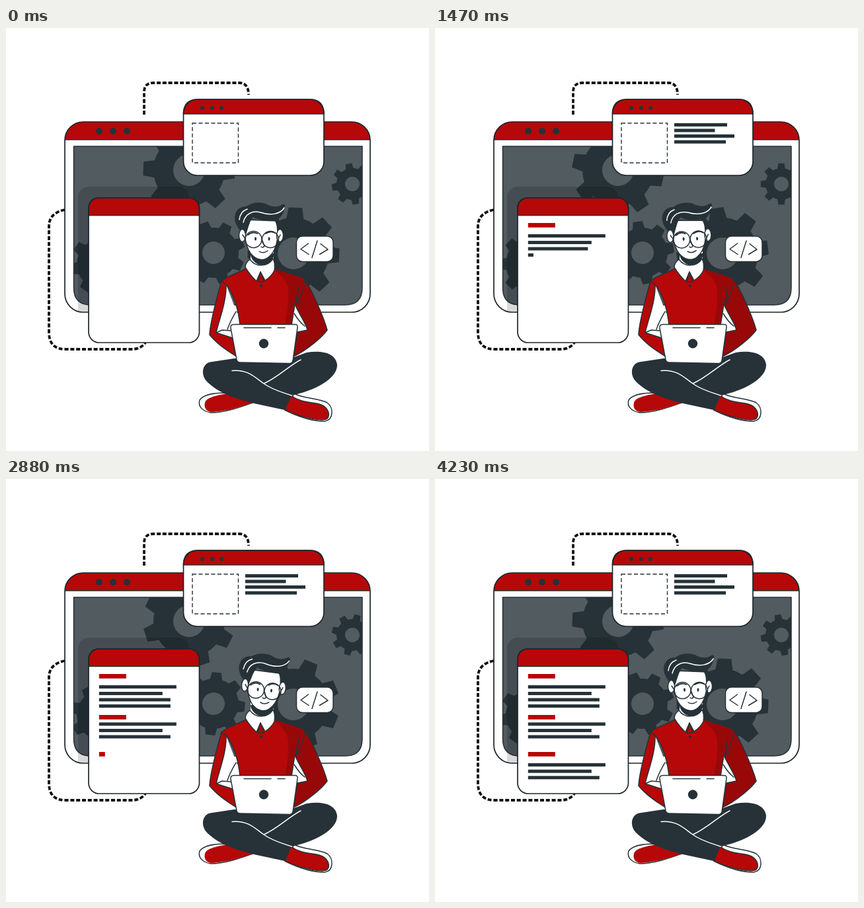
These frames come from a looping animation (640 by 640 pixels, 4.29 s). An HTML page:

```html
<!DOCTYPE html>
<html lang="en">
<head>
<meta charset="utf-8">
<title>Web development</title>
<style>
  html, body { margin: 0; width: 100%; height: 100%; overflow: hidden; background: #fff; }
  svg { display: block; width: 100%; height: 100%; }
  .red { fill: #b60808; }
  .deep { fill: #990809; }
  .dark { fill: #263238; }
  .white { fill: #fff; }
  .line { stroke: #263238; stroke-width: 1.5; stroke-linejoin: round; stroke-linecap: round; }
  .edge { fill: none; stroke: #1c2529; stroke-width: 1.7; }
  .none { fill: none; }
  .pale { fill: none; stroke: #fff; stroke-width: 1.5; stroke-linecap: round; }
  .trail { fill: none; stroke: #111; stroke-width: 3.8; stroke-dasharray: 6 2.8; }
</style>
</head>
<body>
<svg viewBox="0 0 640 640">
  <defs>
    <clipPath id="screen"><path d="M102.500 179H539V393Q539 419 513 419H128.500Q102.500 419 102.500 393Z"/></clipPath>
    <clipPath id="frame"><rect x="89" y="142" width="462" height="288" rx="28"/></clipPath>
  </defs>

  <path class="trail" d="M209 131V97Q209 83 223 83H353Q367 83 367 101"/>
  <path class="trail" d="M89 275Q65 280 65 300V460Q65 486 90 486H190Q204 486 211 476"/>

  <g id="browser">
    <rect class="white" x="89" y="142" width="462" height="288" rx="28"/>
    <g clip-path="url(#frame)">
      <rect class="red line" x="88" y="141" width="464" height="28"/>
    </g>
    <rect class="edge" x="89" y="142" width="462" height="288" rx="28"/>
    <g class="dark">
      <circle cx="141" cy="156" r="5"/><circle cx="162" cy="156" r="5"/><circle cx="183" cy="156" r="5"/>
    </g>
    <g clip-path="url(#screen)">
      <rect x="102" y="179" width="438" height="241" fill="#515b60"/>
      <g id="gears" class="dark"></g>
    </g>
    <path class="none line" d="M102.500 179H539V393Q539 419 513 419H128.500Q102.500 419 102.500 393Z"/>
    <rect clip-path="url(#frame)" x="109" y="240" width="168" height="219" rx="16" opacity=".15"/>
  </g>

  <g id="article">
    <rect class="white" x="125" y="257" width="167.500" height="219" rx="16"/>
    <path class="red line" d="M125 283.500V273Q125 257 141 257H276.500Q292.500 257 292.500 273V283.500Z"/>
    <rect class="edge" x="125" y="257" width="167.500" height="219" rx="16"/>
  </g>

  <g id="popup">
    <rect class="white" x="268.500" y="108" width="212.500" height="115" rx="21"/>
    <path class="red line" d="M268.500 130Q268.500 108 290 108H460Q481 108 481 130Z"/>
    <rect class="edge" x="268.500" y="108" width="212.500" height="115" rx="21"/>
    <g class="dark">
      <circle cx="297" cy="121" r="3"/><circle cx="312" cy="121" r="3"/><circle cx="326" cy="121" r="3"/>
    </g>
    <rect class="none" x="282" y="144" width="69.500" height="60" stroke="#263238" stroke-width="1.400" stroke-dasharray="6 3.500"/>
  </g>

  <g id="bars"></g>

  <g id="tag" class="line none">
    <rect class="white" x="439.500" y="315" width="55.500" height="38.500" rx="9"/>
    <path d="M457.500 326L446 334.500L458 342.500M471 322L463 347.500M476 326.500L487 335L474.500 342.500"/>
  </g>

  <g id="person">
    <path class="white line" d="M332 552C315 552 298 555 293 563C290 572 297 580 310 582C332 582 356 573 373 567Z"/>
    <path class="red" d="M334 553C318 556 303 559 301 567C299 574 303 581 312 581C335 580 358 572 373 567Z"/>
    <path class="white line" d="M436 553C450 561 474 560 486 567C496 574 496 593 482 595C462 595 440 587 422 578Z"/>
    <path class="red line" d="M431 556C446 567 462 566 474 569C488 573 491 585 486 591C478 597 440 587 422 578Z"/>
    <path class="dark" d="M312 505C296 506 294 525 304 535C322 553 350 562 380 569L422 578L431 556C466 549 502 531 501 509C499 492 478 487 455 491L430 500H345Z"/>
    <path class="pale" d="M342 518.500C366 516 377 529 390 538C404 548 418 551 432 556M390 538C411 529 428 511 446 502"/>

    <path class="white" d="M333 388L315 463L346 472L356 448ZM437 416L430 452L441 462L457 458Z"/>
    <path class="red line" d="M326 383C319 408 309 445 308 464C318 477 334 488 349 497L343 469L318 461C322 442 334 414 333 388Z"/>
    <path class="deep line" d="M451 379C462 395 480 435 486 457C478 468 455 488 435 497L441 460L456 457C454 447 444 434 437 418L440 390Z"/>
    <path class="red line" d="M363 364C350 371 333 376 326 383L333 388C345 403 352 428 354 450H432L437 418C446 406 453 392 451 379C438 373 420 369 407 364Z"/>
    <path class="deep" d="M406 365C420 369 438 373 450 380C452 392 445 406 436 418L431 450H422C425 433 428 414 427 397C426 383 418 376 406 367Z"/>
    <path class="none line" d="M443 392L439 414M437 419L447 412M318 461L327 457L340 458M335 456C339 444 344 436 348 429M436 432C441 440 445 446 452 451"/>

    <path class="white" d="M370 338H405V362L386 370L370 360Z"/>
    <path class="dark" d="M370 342C370 350 379 359 388 359C397 359 405 352 406 341Z"/>
    <path class="white line" d="M369 350C364 354 362 358 362 362C367 370 372 377 379 383L385 369L392 382C398 378 403 373 406 367C407 360 407 354 404 349C397 360 379 364 369 350Z"/>
    <path class="red line" d="M385 369L381 384H390Z"/>
    <circle class="dark" cx="386" cy="390" r="2"/>

    <g id="head">
      <path class="white line" d="M361 290C359 312 363 336 374 345C382 352 392 352 398 346C408 338 413 322 412 292Z"/>
      <path class="dark" d="M357 309C349 302 343 289 348 279C351 272 358 270 364 270C371 264 384 263 393 266C402 271 411 272 418 267C423 265 423 270 421 274C420 280 417 285 412 289C417 295 417 302 414 309L410 307C410 300 409 294 405 290C393 292 381 290 374 286C369 291 367 301 363 313Z"/>
      <ellipse class="white line" cx="357.500" cy="314" rx="5" ry="9.500"/>
      <ellipse class="white line" cx="414.500" cy="314" rx="5" ry="9.500"/>
      <path class="pale" d="M353 290C354 281 359 276 365 274M359 294C362 281 373 276 385 279C400 284 415 282 421 272"/>
      <g class="none line">
        <circle cx="374.500" cy="320" r="12.500"/>
        <circle cx="400" cy="320" r="12.500"/>
        <path d="M362 319L358 313M412.500 318L415 313M388 322L391 330Q389 333 386 331M383 338Q389 342 396 337"/>
        <path stroke-width="2" d="M366 313Q373 307 380 311M393 311Q400 306 407 310"/>
      </g>
      <ellipse class="dark" cx="377.500" cy="319" rx="1.500" ry="2.700"/>
      <ellipse class="dark" cx="398" cy="319" rx="1.500" ry="2.700"/>
    </g>

    <path class="white line" d="M345 448.500H437Q442 448.500 441 453L434 503.500Q433 507.500 429 507.500L354 506Q350 506 349 502L340 454Q339 448.500 345 448.500Z"/>
    <path class="none line" d="M360 453.500H401M411 453.500H422"/>
    <circle class="dark" cx="390" cy="477.500" r="7.200"/>
  </g>
</svg>
<script>
  const LOOP = 4290, STEP = 30, SPAN = 4230, GROW = 360;
  const byId = id => document.getElementById(id);

  function add(parent, tag, attrs) {
    const node = document.createElementNS("http://www.w3.org/2000/svg", tag);
    for (const key in attrs) node.setAttribute(key, attrs[key]);
    return parent.appendChild(node);
  }

  // Eight tapered teeth around a ring, with a round hole.
  function gearPath(outer, root, hole) {
    const at = (r, deg) => {
      const a = deg * Math.PI / 180;
      return (r * Math.cos(a)).toFixed(2) + " " + (r * Math.sin(a)).toFixed(2);
    };
    let d = "";
    for (let i = 0; i < 8; i++) {
      const c = i * 45;
      d += (i ? `A${root} ${root} 0 0 1 ` : "M") + at(root, c - 14) +
        "L" + at(outer, c - 8.5) + "L" + at(outer, c + 8.5) + "L" + at(root, c + 14);
    }
    return d + `A${root} ${root} 0 0 1 ${at(root, -14)}Z` +
      `M${hole} 0A${hole} ${hole} 0 1 0 ${-hole} 0A${hole} ${hole} 0 1 0 ${hole} 0Z`;
  }

  // x, y, outer radius, root radius, hole radius, start angle, direction
  const gears = [
    [277, 215, 70, 54, 24, 2, -1],
    [314, 340, 48, 38, 17, -64, -1],
    [435, 341, 70, 54, 24, 2.5, 1],
    [524, 236, 31.5, 24, 11, -10, -1],
    [145, 357, 48, 38, 17, 125, -1]
  ].map(([x, y, outer, root, hole, phase, way]) => ({
    x, y, phase, way,
    node: add(byId("gears"), "path", { d: gearPath(outer, root, hole), "fill-rule": "evenodd" })
  }));

  // y, full width, start time
  const popupLines = [[144, 80, 30], [152.5, 61.5, 308], [161, 91, 586], [169.8, 78, 870]];
  const articleLines = [
    [295, 41, 60], [312, 117, 366], [322, 96, 672], [331.5, 108, 1168], [341, 108, 1443],
    [357, 41, 1710], [368.3, 117, 1975], [378, 96, 2224], [387.5, 108, 2515],
    [413, 41, 2801], [430, 117, 3090], [439.7, 96, 3375], [449.3, 108, 3664]
  ];
  const makeBar = x => ([y, width, start]) => {
    const title = width === 41;
    return {
      width, start,
      node: add(byId("bars"), "rect", { x, y, height: title ? 6.8 : 5, class: title ? "red" : "dark" })
    };
  };
  const bars = [...popupLines.map(makeBar(362)), ...articleLines.map(makeBar(140.8))];

  // Share of the loop, tilt in degrees
  const tilts = [[0, 0], [0.16, -5.4], [0.645, 5.2], [0.886, 0], [1, 0]];
  function tiltAt(p) {
    const i = Math.max(1, tilts.findIndex(k => p <= k[0]));
    const [p0, a] = tilts[i - 1], [p1, b] = tilts[i];
    return a + (b - a) * (1 - Math.cos(Math.PI * (p - p0) / (p1 - p0))) / 2;
  }

  function draw(time) {
    const t = Math.min(SPAN, Math.floor((time % LOOP) / STEP) * STEP);
    const p = t / SPAN;
    for (const g of gears)
      g.node.setAttribute("transform", `translate(${g.x} ${g.y}) rotate(${g.phase + g.way * 360 * p})`);
    for (const b of bars)
      b.node.setAttribute("width", b.width * Math.min(1, Math.max(0, (t - b.start) / GROW)));
    byId("head").setAttribute("transform", `rotate(${tiltAt(p)} 386 360)`);
  }

  const begin = performance.now();
  function tick() {
    draw(performance.now() - begin);
    requestAnimationFrame(tick);
  }
  tick();
</script>
</body>
</html>
```
